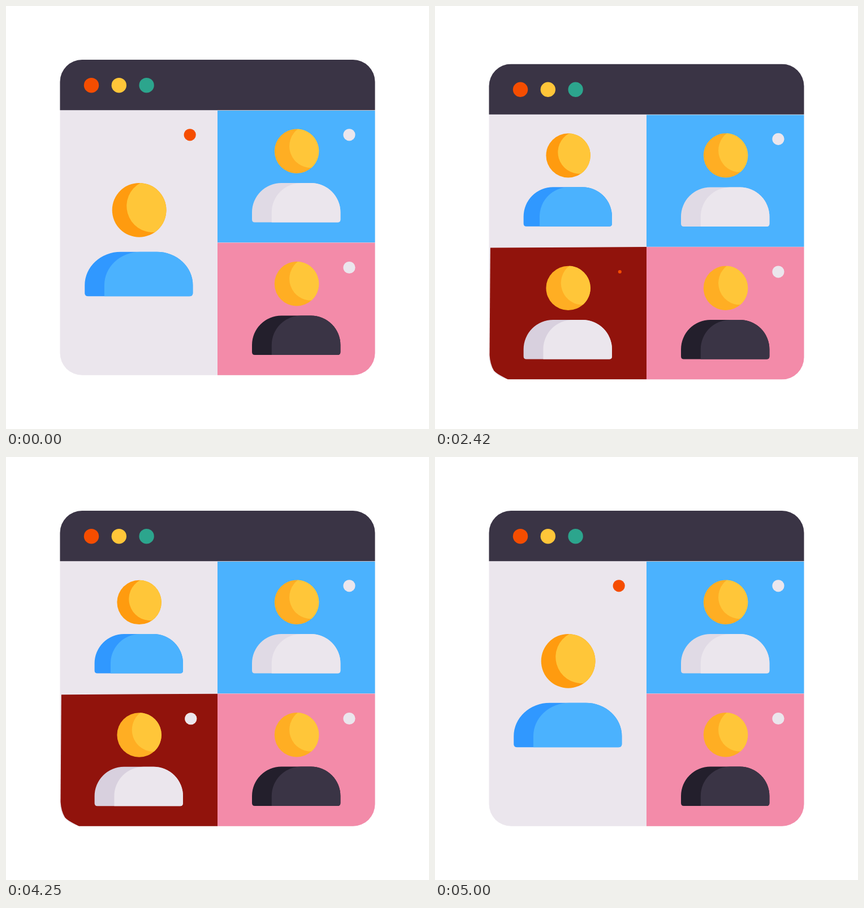
Recreate the animation shown at these times as an HTML page. Size 748 by 748 pixels, loop 5.02 s.

```html
<!DOCTYPE html>
<html lang="en">
<head>
<meta charset="utf-8">
<title>Video call</title>
<style>
  html, body { margin: 0; width: 100%; height: 100%; overflow: hidden; background: #fff; }
  svg { display: block; width: 100%; height: 100%; }
</style>
</head>
<body>
<svg viewBox="0 0 748 748">
  <defs>
    <clipPath id="frame"><rect x="95.5" y="95" width="557" height="557.8" rx="39"/></clipPath>
    <clipPath id="guestClip"><path id="guestMask"/></clipPath>
  </defs>
  <g id="window">
    <g clip-path="url(#frame)">
      <rect x="95" y="95" width="558" height="558" fill="#ebe6ed"/>
      <rect x="95" y="95" width="558" height="89.2" fill="#3a3445"/>
      <rect x="374" y="185" width="279" height="233.2" fill="#4bb2fe"/>
      <rect x="374" y="418.6" width="279" height="235" fill="#f38ba9"/>
      <g id="people"></g>
    </g>
    <g id="guestArea" clip-path="url(#guestClip)">
      <g id="guest">
        <path d="M95 420L374 418.5V660H95Z" fill="#91130c"/>
      </g>
    </g>
  </g>
</svg>
<script>
const LOOP = 5020, ENTER = 2000, EXIT = 4250, DROP = 234;
const LIGHT = '#ebe6ed', RED = '#f54d00', YELLOW = '#ffc639';
const $ = id => document.getElementById(id);

function add(parent, tag, attrs = {}) {
  const el = document.createElementNS('http://www.w3.org/2000/svg', tag);
  for (const key in attrs) el.setAttribute(key, attrs[key]);
  return parent.appendChild(el);
}

function dot(parent, x, y, r, fill) {
  return add(parent, 'circle', { cx: x, cy: y, r, fill });
}

// Crescent-shaded head, centred on its own origin.
function addHead(parent, shade, [x1, y1, x2, y2, r]) {
  const head = add(parent, 'g');
  dot(head, 0, 0, 39.2, shade);
  add(head, 'path', {
    d: `M${x1} ${y1}A${r} ${r} 0 0 0 ${x2} ${y2}A39.3 39.3 0 0 0 ${x1} ${y1}Z`, fill: YELLOW
  });
  return head;
}

// Shoulders hanging from y = 0; the light part starts further right.
function addBody(parent, shade, fill, edge) {
  const body = add(parent, 'g');
  const right = 'H26.2A52 52 0 0 1 78.2 52V64.5Q78.2 69.5 73.2 69.5';
  add(body, 'path', { d: `M-73.2 69.5Q-78.2 69.5 -78.2 64.5V52A52 52 0 0 1 -26.2 0${right}Z`, fill: shade });
  add(body, 'path', { d: `M${edge} 69.5V52A52 52 0 0 1 ${edge + 52} 0${right}Z`, fill });
  return body;
}

const SOFT = [2, -39.25, 26, 29.5, 38.4];
const DEEP = [1.5, -39.2, 22.5, 32.2, 38.1];

function addPerson(parent, x, y, shade, fill) {
  const person = add(parent, 'g', { transform: `translate(${x} ${y})` });
  addHead(person, '#ffae23', SOFT);
  addBody(person, shade, fill, -43.4).setAttribute('transform', 'translate(-.8 56.2)');
}

const people = $('people'), guest = $('guest');
[[151, RED], [199.8, YELLOW], [248.6, '#2ca58d']].forEach(([x, fill]) => dot(people, x, 140.2, 13.2, fill));
addPerson(people, 514, 256.8, '#e0dae5', LIGHT);
addPerson(people, 514, 491.3, '#231f2c', '#3a3445');
dot(people, 607, 227.8, 10.6, LIGHT);
dot(people, 607, 462.5, 10.6, LIGHT);

const hostDot = dot(people, 325.2, 227.8, 10.6, RED);
const hostHead = addHead(people, '#ff9b0f', DEEP);
const hostBody = addBody(people, '#3098ff', '#4bb2fe', -49.8);

const visitor = add(guest, 'g');
addPerson(visitor, 235.6, 491.3, '#d8d0de', LIGHT);
const guestDot = dot(visitor, 326.8, 462.5, 10.6, RED);
const guestDotOff = dot(visitor, 326.8, 462.5, 10.6, LIGHT);

const clamp = x => Math.min(1, Math.max(0, x));
const mix = (a, b, k) => a + (b - a) * k;
const span = (t, start, length) => clamp((t - start) / length);
const smooth = x => x * x * (3 - 2 * x);
const glide = (t, start, length) => Math.sin(Math.PI / 2 * span(t, start, length) ** 1.22);

// Quick push down, then a long settling return.
function kick(t, start, rise, fall, height) {
  const dt = t - start;
  if (dt <= 0 || dt >= rise + fall) return 0;
  return height * (dt < rise
    ? Math.sin(Math.PI / 2 * dt / rise) ** 2
    : Math.cos(Math.PI / 2 * (dt - rise) / fall) ** 4.5);
}

function draw(t) {
  const sway = 7 * Math.sin(Math.PI * span(t, 2800, 1300)) ** 2;
  const y = kick(t, ENTER, 170, 570, 24.5) + sway + kick(t, EXIT, 150, 590, 27);
  $('window').setAttribute('transform', `translate(0 ${y})`);

  const shrink = glide(t, ENTER, 312) - glide(t, EXIT, 392);
  const headY = mix(360.8, 256.8, shrink), scale = mix(1.222, 1, shrink);
  hostHead.setAttribute('transform', `translate(235.6 ${headY}) scale(${scale})`);
  hostBody.setAttribute('transform',
    `translate(234.8 ${headY + mix(74, 56, shrink)}) scale(${scale} ${mix(1.13, 1, shrink)})`);

  const shown = glide(t, ENTER, 341) - glide(t, EXIT, 430), k = 1 - shown;
  $('guestArea').style.display = shown > 0.001 ? '' : 'none';
  guest.setAttribute('transform', `translate(0 ${DROP * k})`);
  visitor.setAttribute('transform', `translate(0 ${7 * k})`);
  $('guestMask').setAttribute('d',
    `M98 400L96.5 610Q97.5 626 ${104 + 9 * k} ${637 + 4 * k}` +
    `Q${107 + 14 * k} ${642 + 8 * k} ${129 + 22 * k} ${652.8 - 0.5 * k}H374V400Z`);

  const hostOn = 1 - smooth(span(t, 2040, 120)) + smooth(span(t, 4350, 150));
  hostDot.setAttribute('r', 10.6 * hostOn);
  const guestOn = smooth(span(t, 2350, 200));
  guestDot.setAttribute('r', 10.6 * guestOn);
  guestDotOff.setAttribute('r', 10.6 * guestOn);
  guestDotOff.setAttribute('opacity', smooth(span(t, 3350, 200)));
}

const begin = performance.now();
function tick() {
  draw((performance.now() - begin) % LOOP);
  requestAnimationFrame(tick);
}
tick();
</script>
</body>
</html>
```
